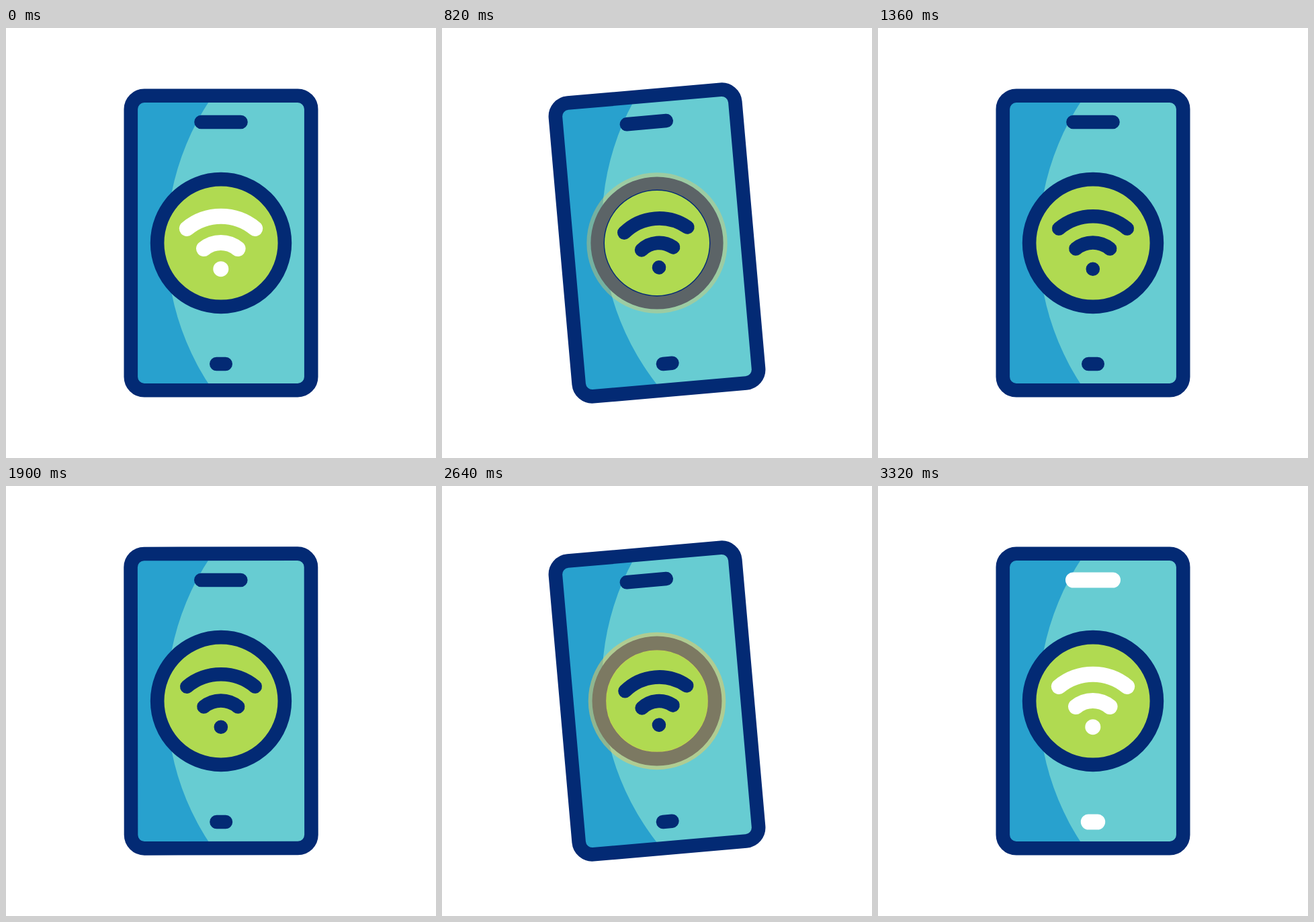
These frames come from a looping animation (640x640 px, 3.6 s). An HTML page:

```html
<!DOCTYPE html>
<html lang="en">
<head>
<meta charset="utf-8">
<title>Contactless phone</title>
<style>
  html, body { margin: 0; height: 100%; overflow: hidden; background: #fff; }
  svg { display: block; width: 100vw; height: 100vh; }
  .line { fill: none; stroke: #032a74; stroke-width: 20.6; stroke-linecap: round; }
</style>
</head>
<body>
<svg viewBox="0 0 640 640">
  <clipPath id="screen"><rect x="186" y="101" width="268" height="438" rx="20"/></clipPath>
  <g id="phone">
    <g clip-path="url(#screen)">
      <rect x="180" y="95" width="280" height="450" fill="#28a1ce"/>
      <circle cx="623.6" cy="320" r="384.4" fill="#67ccd2"/>
    </g>
    <rect class="line" x="185.8" y="100.8" width="268.4" height="438.4" rx="20"/>
    <path id="buttons" class="line" d="M290.5 140H349.5M313.3 500H326.7"/>
  </g>
  <circle id="ring" class="line" cx="320" cy="320" style="fill:#b0da51"/>
  <circle id="ripple" cx="320" cy="320" fill="none" stroke="#fbcc4f"/>
  <path id="wifi" class="line" d="M269.3 298.5A79.7 79.7 0 0 1 370.7 298.5M294.5 328.5A40 40 0 0 1 345.1 328.5M319.8 358.7h.01"/>
</svg>
<script>
const LOOP = 3600, SECOND_TAP = 1885;
const LINE = 20.6, RING = 94.9, PRESSED = 71;
const el = id => document.getElementById(id);
const [phone, buttons, ring, ripple, wifi] =
  ['phone', 'buttons', 'ring', 'ripple', 'wifi'].map(el);

const span = (t, from, to) => Math.min(1, Math.max(0, (t - from) / (to - from)));
const ease = x => (1 - Math.cos(Math.PI * x)) / 2;

function paint(path, white, scale = 1) {
  path.style.stroke = white ? '#fff' : '#032a74';
  path.style.strokeWidth = (white ? 23 : LINE) / scale;
}

function draw(now) {
  const time = now % LOOP;
  const t = time < SECOND_TAP ? time : time - SECOND_TAP;
  const flash = time >= 3320;

  // Tilt, hold and return
  const angle = -5 * (ease(span(t, 0, 220)) - ease(span(t, 950, 1100)));
  const turn = `rotate(${angle} 320 320)`;
  phone.setAttribute('transform', turn);

  // Press in, then a long release
  const press = ease(span(t, 0, 500)) - ease(span(t, 500, 1360) ** 0.44);
  const radius = RING - (RING - PRESSED) * press;
  const scale = radius / RING;
  ring.setAttribute('r', radius);

  const glow = span(t, 400, 500) - span(t, 500, 1000);
  ripple.setAttribute('r', PRESSED + 30 * span(t, 400, 1000));
  ripple.setAttribute('stroke-width', LINE + 13 * glow);
  ripple.setAttribute('opacity', glow);

  wifi.setAttribute('transform',
    `${turn} translate(320 327) scale(${scale}) translate(-320 -327)`);
  paint(wifi, flash || time < 790, scale);
  paint(buttons, flash);
}

const start = performance.now();
function tick() {
  draw(performance.now() - start);
  requestAnimationFrame(tick);
}
tick();
</script>
</body>
</html>
```
